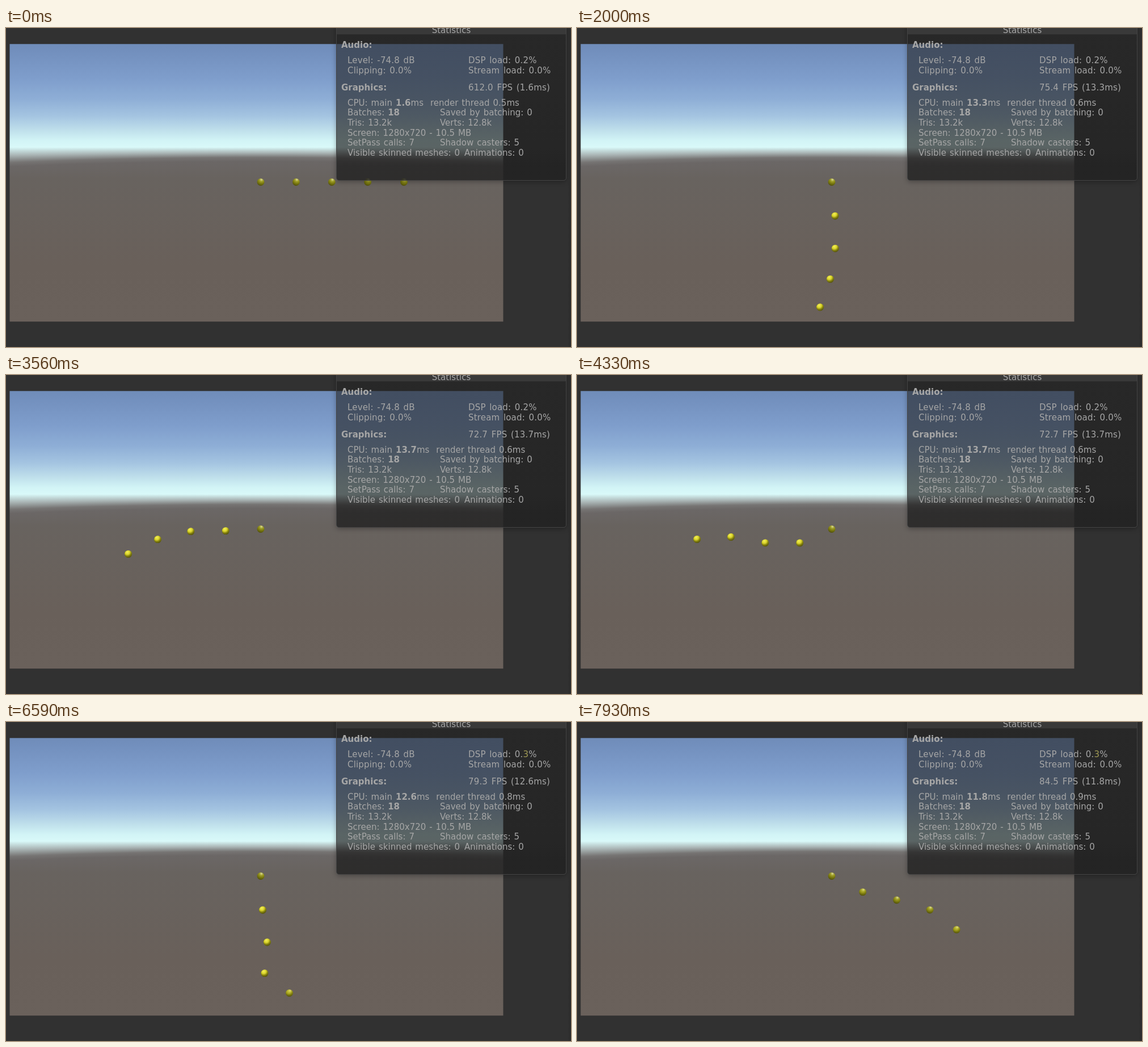
Write an HTML page with a canvas that moves like this. It is 996 by 562 pixels and loops after 8 s.

```html
<!DOCTYPE html>
<html lang="en">
<head>
<meta charset="utf-8">
<title>Swinging chain</title>
<style>
  html, body { margin: 0; width: 100%; height: 100%; overflow: hidden; background: #313131; }
  #stage { position: relative; width: 996px; height: 562px; overflow: hidden; }
  #stage::after {
    content: ""; position: absolute; right: 0; top: 0; width: 6px; height: 100%;
    background: linear-gradient(90deg, transparent, #2a2a2a);
  }
  canvas, svg { position: absolute; left: 0; top: 0; }
  .panel {
    position: absolute; left: 582px; top: -20px; width: 404px; height: 287px;
    border: 1px solid #444; border-radius: 5px;
    background: linear-gradient(rgba(33, 33, 33, .57) 30px, rgba(33, 33, 33, .69) 232px, rgba(33, 33, 33, .82) 262px);
    box-shadow: 0 2px 9px rgba(0, 0, 0, .3);
  }
  .panel::before {
    content: ""; position: absolute; left: 0; right: 0; top: 0; height: 30px;
    background: #393939; border-bottom: 1px solid #2b2b2b;
  }
  text {
    font: 15px "DejaVu Sans", Verdana, sans-serif; word-spacing: 1.2px;
    fill: #a6a6a6; white-space: pre;
  }
  .b { font-weight: bold; word-spacing: 0; }
  .wide { letter-spacing: .17px; word-spacing: 1.7px; }
  .olive { fill: #a09a55; }
</style>
</head>
<body>
<div id="stage">
  <canvas id="scene" width="996" height="562"></canvas>
  <svg width="996" height="562">
    <defs>
      <radialGradient id="lit" cx=".38" cy=".25" r=".8">
        <stop offset="0" stop-color="#f4f05a"/>
        <stop offset=".4" stop-color="#d8d32a"/>
        <stop offset=".68" stop-color="#838010"/>
        <stop offset="1" stop-color="#504e0c"/>
      </radialGradient>
      <radialGradient id="dull" cx=".6" cy=".16" r=".85">
        <stop offset="0" stop-color="#dcdca0"/>
        <stop offset=".28" stop-color="#a3a22c"/>
        <stop offset=".6" stop-color="#7e7d10"/>
        <stop offset="1" stop-color="#504f0c"/>
      </radialGradient>
    </defs>
    <g id="balls"></g>
  </svg>
  <div class="panel"></div>
  <svg width="996" height="562">
    <text x="785" y="9" text-anchor="middle">Statistics</text>
    <text x="591" y="35" class="b">Audio:</text>
    <text x="602" y="62" class="wide">Level: -74.8 dB</text>
    <text x="815" y="62" class="wide">DSP load: 0.<tspan id="dsp">2</tspan>%</text>
    <text x="602" y="80" class="wide">Clipping: 0.0%</text>
    <text x="815" y="80" class="wide">Stream load: 0.0%</text>
    <text x="591" y="109.5" class="b">Graphics:</text>
    <text x="815" y="109.5" class="wide" id="fps"></text>
    <text x="602" y="136.5">CPU: main <tspan class="b" id="main"></tspan>ms  render thread <tspan id="render"></tspan>ms</text>
    <text x="602" y="154">Batches: <tspan class="b">18</tspan></text>
    <text x="765" y="154">Saved by batching: 0</text>
    <text x="602" y="172">Tris: 13.2k</text>
    <text x="765" y="172">Verts: 12.8k</text>
    <text x="602" y="189.5">Screen: 1280x720 - 10.5 MB</text>
    <text x="602" y="207">SetPass calls: <tspan id="pass"></tspan></text>
    <text x="765" y="207">Shadow casters: 5</text>
    <text x="602" y="225">Visible skinned meshes: 0</text>
    <text x="808" y="225">Animations: 0</text>
  </svg>
</div>
<script>
const LOOP = 8000, STALL = 4635, RESUME = 5290;
const $ = id => document.getElementById(id);

// A few poses: time, then link angles in degrees from straight down, right is positive
const POSES = [
  [330, 90, 90, 90, 90],
  [1000, 44, 67, 86, 90],
  [1306, 26, 30.3, 58.8, 83.8],
  [1970, 7, 2, -6, -15],
  [2698, -34.8, -42.7, -60.1, -71.1],
  [3551, -87.1, -89, -76.5, -64.1],
  [4150, -76, -99, -97, -78],
  [4800, -33.2, -52, -97.7, -103.9],
  [5580, 4, -8, -50, -54],
  [6096, 3.3, 7.7, -4.2, 49.3],
  [6410, 17.5, 25, 35, 70],
  [7435, 62.4, 76.5, 73.2, 53.6]
];

// Counter readings: time, frames per second, render thread ms
const READINGS = [
  [0, 612, 0.5], [690, 75.4, 0.6], [2160, 75, 0.6], [3320, 72.74, 0.6],
  [STALL, 70.2, 0.5], [6350, 79.3, 0.8], [7295, 84.5, 0.9]
];

function slope(i, k) {
  if (i === 0) return 0;
  const p = POSES[i - 1], n = POSES[i + 1] || POSES[i];
  return (n[k] - p[k]) / (n[0] - p[0]);
}

// Cubic Hermite through the poses
function angles(t) {
  const next = POSES.findIndex(p => p[0] > t);
  if (next <= 0) return POSES.at(next).slice(1);
  const i = next - 1, a = POSES[i], b = POSES[next];
  const d = b[0] - a[0], u = (t - a[0]) / d, v = 1 - u;
  return [1, 2, 3, 4].map(k =>
    v * v * ((1 + 2 * u) * a[k] + u * d * slope(i, k)) +
    u * u * ((3 - 2 * u) * b[k] - v * d * slope(next, k)));
}

// The picture advances in steps and stalls for a while in the middle
function motionTime(t) {
  const step = (from, size) => from + Math.floor((t - from) / size) * size;
  if (t < 380) return 0;
  if (t < STALL) return step(373, 77.5);
  if (t < RESUME) return 4720;
  return (t < 5405 ? RESUME : step(5405, 78.75)) - 490;
}

// World units (one link each) to stage pixels
function project(x, y) {
  const depth = 1 + 0.023 * y - 0.00365 * x;
  return [449 + 62.2 * x / depth, 271.5 + 61.2 * y / depth];
}

function disc(fill) {
  const c = document.createElementNS("http://www.w3.org/2000/svg", "circle");
  c.setAttribute("r", 6.4);
  c.setAttribute("fill", `url(#${fill})`);
  return $("balls").appendChild(c);
}
const balls = Array.from({ length: 5 }, () => [disc("dull"), disc("lit")]);

// A ball catches more light the further its link turns away from the right
function place(ball, x, y, angle) {
  const [cx, cy] = project(x, y);
  for (const c of ball) {
    c.setAttribute("cx", cx.toFixed(2));
    c.setAttribute("cy", cy.toFixed(2));
  }
  ball[1].setAttribute("opacity", 1 - Math.max(0, Math.sin(angle)) ** 2);
}

function paintScene() {
  const g = $("scene").getContext("2d");
  const sky = [
    [10, "#6c89b4"], [40, "#728fbd"], [90, "#7f9ecc"], [125, "#8eaed6"],
    [155, "#a4c4e1"], [180, "#bfdfeb"], [198, "#d2f4f6"], [210, "#d9f9f9"]
  ];
  g.beginPath();
  g.rect(6.5, 28.3, 870, 488.9);
  g.clip();
  for (let x = 6; x < 877; x++) {
    // The far edge of the ground bends down towards the sides
    const edge = 228 + 9 * ((x - 441) / 434) ** 2;
    const fill = g.createLinearGradient(0, 10, 0, 517);
    const stop = (y, color) => fill.addColorStop((y - 10) / 507, color);
    for (const [y, color] of sky) stop(y, color);
    stop((edge + 212) / 2, "#a9b4b4");
    stop(edge, "#767473");
    stop(edge + 7, "#6b6766");
    stop(265, "#68635f");
    stop(420, "#69605a");
    stop(517, "#6a615b");
    g.fillStyle = fill;
    g.fillRect(x, 28, 1, 490);
  }
}

function showStats(t) {
  const [, fps, render] = READINGS.findLast(r => r[0] <= t);
  const main = (1000 / fps).toFixed(1), late = t >= 6350;
  $("fps").textContent = `${fps.toFixed(1)} FPS (${main}ms)`;
  $("main").textContent = main;
  $("render").textContent = render;
  $("pass").textContent = fps === 70.2 ? 6 : 7;
  $("dsp").textContent = late ? 3 : 2;
  $("dsp").setAttribute("class", late ? "olive" : "");
}

function draw(t) {
  let x = 0, y = 0;
  place(balls[0], 0, 0, Math.PI / 2);
  angles(motionTime(t)).forEach((deg, i) => {
    const a = deg * Math.PI / 180;
    x += Math.sin(a);
    y += Math.cos(a);
    place(balls[i + 1], x, y, a);
  });
  showStats(t);
}

paintScene();
const start = performance.now();
function tick() {
  draw((performance.now() - start) % LOOP);
  requestAnimationFrame(tick);
}
tick();
</script>
</body>
</html>
```
